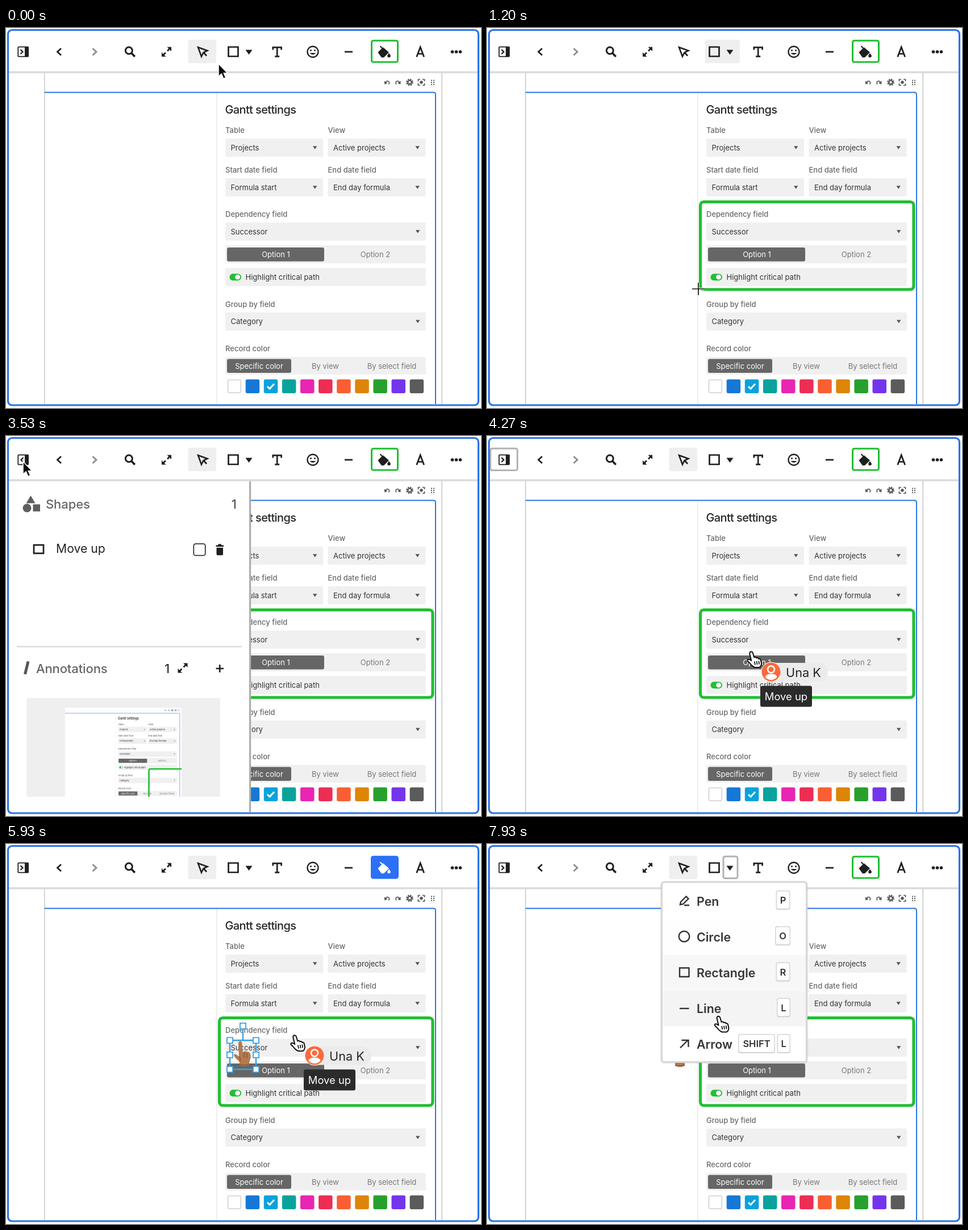
An HTML page that plays this animation: 836x670 px, repeating every 8 s.

```html
<!DOCTYPE html>
<html lang="en">
<head>
<meta charset="utf-8">
<title>Gantt settings</title>
<style>
html, body { margin: 0; width: 100%; height: 100%; overflow: hidden; background: #fff; }
svg { display: block; width: 100%; height: 100%; }
text { font-family: Inter, Roboto, sans-serif; font-optical-sizing: none; white-space: pre; }
.ink { fill: none; stroke: #1f1f1f; stroke-width: 2.7; }
.solid { fill: #1f1f1f; }
.focus { fill: none; stroke: #b3b3b3; stroke-width: 3; }
.small { fill: none; stroke: #555; stroke-width: 1.7; }
</style>
</head>
<body>
<svg id="stage" viewBox="0 0 836 670" preserveAspectRatio="none"></svg>
<script>
const TICK = 1000 / 15, LOOP = 8000;

// ---------- markup helpers ----------
const rect = (x, y, w, h, fill, r = 0, more = '') =>
  `<rect x="${x}" y="${y}" width="${w}" height="${h}" rx="${r}" fill="${fill}" ${more}/>`;
const text = (s, x, y, size, fill, weight = 400, more = '') =>
  `<text x="${x}" y="${y}" font-size="${size}" fill="${fill}" font-weight="${weight}" ${more}>${s}</text>`;
const path = (d, cls = 'ink', more = '') => `<path d="${d}" class="${cls}" ${more}/>`;
const group = (id, body, more = '') => `<g id="${id}" ${more}>${body}</g>`;
const mid = 'text-anchor="middle"';
const expand = (x, y) => path(
  `M${x - 6} ${y + 6}l4.5-4.5M${x + 1.5} ${y - 1.5}L${x + 6} ${y - 6}`, 'ink', 'stroke-width="2.4"') +
  path(`M${x + 1} ${y - 8.5}h7.5v7.5zM${x - 1} ${y + 8.5}h-7.5v-7.5z`, 'solid');

// ---------- settings panel ----------
const label = (s, x, y) => text(s, x, y, 13, '#696969', 500);
const select = (s, x, y, w) => rect(x, y, w, 32, '#f0f0f0', 2) +
  text(s, x + 9.5, y + 20.8, 13, '#333') +
  path(`M${x + w - 18} ${y + 13.3}h7.4l-3.7 5.4z`, 'none', 'fill="#555"');

function panel() {
  const colors = ['#fff', '#1677d6', '#08a2dc', '#0aa39b', '#e826b1', '#ec2e55',
    '#f95f33', '#de8507', '#28a02d', '#7335ec', '#5b5b5b'];
  const swatches = colors.map((c, i) => i
    ? rect(389.6 + i * 32.1, 619.5, 24.5, 24.5, c, 3)
    : rect(390.5, 620.3, 22.8, 22.8, c, 2.5, 'stroke="#d5d5d5" stroke-width="1.8"')).join('');
  return rect(370, 114, 1.4, 549, '#e8e8e8') +
    path('M68 113.5H752Q756 113.5 756 117.5V663', 'none', 'fill="none" stroke="#2b72e6" stroke-width="2"') +
    text('Gantt settings', 385.5, 150.7, 20, '#262626', 500, 'letter-spacing="-.62"') +
    label('Table', 386, 185) + label('View', 566.5, 185) +
    select('Projects', 386, 195, 172) + select('Active projects', 566.5, 195, 172) +
    label('Start date field', 386, 255) + label('End date field', 566.5, 255) +
    select('Formula start', 386, 265, 172) + select('End day formula', 566.5, 265, 172) +
    label('Dependency field', 386, 333) + select('Successor', 386, 343, 353) +
    rect(386, 383, 353, 32, '#f0f0f0', 2) + rect(389, 387, 171, 24.5, '#666', 3) +
    text('Option 1', 475, 404.3, 13, '#fff', 400, mid) + text('Option 2', 650, 404.3, 13, '#777', 400, mid) +
    rect(386, 423, 353, 32, '#f0f0f0', 2) + rect(393.5, 433.2, 20.5, 12, '#1fbf31', 6) +
    '<circle cx="407.6" cy="439.2" r="4.4" fill="#fff"/>' +
    text('Highlight critical path', 421.5, 444.2, 13, '#333') +
    label('Group by field', 386, 491.5) + select('Category', 386, 501.5, 353) +
    label('Record color', 386, 570) + rect(386, 580, 353, 31, '#f0f0f0', 2) +
    rect(389, 583.5, 113, 24.5, '#666', 3) +
    text('Specific color', 445.5, 600.8, 13, '#fff', 400, mid) +
    text('By view', 562, 600.8, 13, '#777', 400, mid) +
    text('By select field', 679, 600.8, 13, '#777', 400, mid) +
    swatches + path('M460 632l4 4 8-8.5', 'none', 'fill="none" stroke="#fff" stroke-width="3"') + tools();
}

function tools() {
  const dots = [0, 1, 2, 3, 4, 5].map(i =>
    rect(748 + i % 2 * 4, 91.5 + (i >> 1) * 3.6, 2, 2, '#555')).join('');
  return path('M668 97q1-4.5 4.5-3.2 3.5 1.7 1 5.4M692.500 97q-1-4.500-4.500-3.200-3.500 1.700-1 5.400', 'small') +
    path('M665.500 93.500l1 6 5-2.500zM695 93.500l-1 6-5-2.500z', 'none', 'fill="#555"') +
    '<circle cx="710.5" cy="95.700" r="5" fill="none" stroke="#555" stroke-width="2.600" stroke-dasharray="2.400 1.520"/>' +
    '<circle cx="710.5" cy="95.700" r="3.200" class="small" style="stroke-width:2.200"/>' +
    path('M725.500 94v-3.500h3.500M733 90.500h3.500V94M736.500 97.500v3.500H733M729 101h-3.500v-3.500', 'small') +
    '<circle cx="731" cy="95.700" r="2.700" fill="#555"/>' + dots;
}

// ---------- toolbar ----------
function toolbar() {
  return rect(5, 5, 826, 72, '#fff') + rect(5, 76.300, 826, 3.400, '#dadada') +
    rect(0, 20.500, 0, 41.500, '#efefef', 4, 'id="active"') +
    rect(21.300, 33.300, 17.500, 17, '#fff', 1, 'stroke="#1f1f1f" stroke-width="1.800"') +
    rect(33, 33, 7, 17.600, '#1f1f1f') +
    path('', 'ink', 'id="side" style="stroke-width:2.200"') +
    path('M97 36l-6.500 6 6.500 6') + path('M152.500 36l6.500 6-6.500 6', 'ink', 'style="stroke:#8a8a8a"') +
    '<circle cx="216.300" cy="39.800" r="6" class="ink" style="stroke-width:3"/>' +
    path('M220.500 44l6.300 6.500', 'ink', 'style="stroke-width:3.600"') + expand(282.500, 42) +
    path('M338 34l16.500 6-7 3.300-3.500 7z', 'ink', 'style="stroke-width:2.500"') +
    path('M347.500 43l5.500 6', 'ink') +
    path('M391.500 33.500h17v16.500h-17z') + path('M421.500 38.500h12l-6 8.500z', 'solid') +
    path('M469.800 38.500v-4.300h14.800v4.300M477.200 34v16M473.200 50.200h8') +
    '<circle cx="540" cy="42" r="9.500" class="ink" style="stroke-width:2.300"/>' +
    '<circle cx="536.500" cy="39.500" r="1.500" class="solid"/><circle cx="543.500" cy="39.500" r="1.500" class="solid"/>' +
    path('M534.500 44q5.500 6 11 0z', 'solid') + path('M596 42h14', 'ink') +
    rect(643.500, 22.300, 46, 37.700, '#fff', 3, 'id="fillBox" stroke-width="3"') +
    group('bucket', '<path d="M655 43l8.500-8.500 10 8.500-8.500 8.500h-4z"/>' +
      '<path d="M658.500 32l7 7M657 43l7-7 8 7" fill="none" stroke-width="2"/>' +
      '<path d="M674 45q5 6 0 6.500-5-.500 0-6.500z"/>') +
    path('M722.700 51l6.500-17.300 6.500 17.300M725 45.500h8.500') +
    [785.500, 792.500, 799.500].map(x => `<circle cx="${x}" cy="42" r="2.800" class="solid"/>`).join('') +
    '<rect id="sideFocus" class="focus" x="6" y="22" width="47.500" height="38.500" rx="3"/>' +
    '<rect id="caretFocus" class="focus" x="416" y="22" width="25" height="38.500" rx="3"/>';
}

// ---------- sidebar ----------
function sidebar() {
  const k = 205 / 699;
  return rect(5, 79.700, 424, 584, '#fff') + rect(428, 79.700, 3.200, 584, '#adadad') +
    path('M43.500 105l8 13.500h-16zM47.500 120.500h12.500v12.500h-12.500z', 'none', 'fill="#5f5f5f"') +
    '<circle cx="37" cy="127" r="7.500" fill="#5f5f5f"/>' +
    text('Shapes', 70, 128, 22, '#666', 500, 'letter-spacing="-.1"') +
    text('1', 406, 128, 22, '#555', 500, 'text-anchor="end"') +
    path('M49 192.200h17v14.600H49z') +
    rect(83.700, 182.700, 223.600, 33.600, '#fff', 0, 'id="input" stroke="#b3b3b3" stroke-width="3.500"') +
    text('', 88, 206.300, 21.200, '#222', 400, 'id="typed"') +
    rect(0, 186, 1.600, 25, '#111', 0, 'id="caret"') +
    rect(330.300, 190.200, 20.500, 20.500, '#fff', 3.500, 'stroke="#333" stroke-width="1.800"') +
    path('M369.500 192.500h13.500v2.800h-13.500zM373.500 190.500h5.500v2h-5.500zM370.500 197h11.500v11.500q0 1.800-1.800 1.800h-8q-1.700 0-1.700-1.800z', 'solid') +
    rect(19, 370, 396, 2.600, '#dcdcdc') +
    path('M39 397.500l-5.500 22.500', 'none', 'stroke="#555" stroke-width="5"') +
    text('Annotations', 53, 417.500, 22, '#666', 500, 'letter-spacing="-.12"') +
    text('1', 279, 417.500, 22, '#333', 500) + expand(311, 409) +
    path('M369.500 410h13.500M376.200 403.300v13.500') +
    rect(36, 462, 341, 174, '#efefef', 3) +
    `<g clip-path="url(#thumb)">${rect(104, 479, 205, 157, '#fff')}
     <use href="#panel" transform="translate(${104 - 68 * k} ${479 - 80 * k}) scale(${k})"/>
     <path d="M309 587H254.500Q251.500 587 251.500 590V640" fill="none" stroke="#1fbf31" stroke-width="2.600"/></g>`;
}

// ---------- shape menu ----------
function menu() {
  const names = ['Pen', 'Circle', 'Rectangle', 'Line', 'Arrow'];
  const icons = ['M340 107l1-5 9.500-9.500 4 4-9.500 9.500zM347 108h9', '', 'M339 218.500h16.500v15.500h-16.500z',
    'M339 290h16.500', 'M340 359.500l13.500-13.500M342.500 346h12v12'];
  const key = (s, x, y, w) => rect(x, y - 17, w, 34, '#d4d4d4', 4) +
    rect(x + 1.500, y - 15.500, w - 3, 30.300, '#fff', 3) +
    text(s, x + w / 2, y + 6, 16.500, '#333', 600, mid);
  const rows = names.map((s, i) => {
    const y = 101 + i * 63;
    return rect(310, y - 31.500, 251, 63, '#f4f4f4', 0, `id="row${i}"`) +
      path(icons[i], 'ink', 'style="stroke:#333;stroke-width:2.400"') +
      text(s, 369, y + 7.800, 21.400, '#363636', 600);
  }).join('');
  return rect(304.500, 65.500, 261, 322, '#000', 6, 'opacity=".06"') +
    rect(307.500, 67, 255, 317.500, '#fff', 5, 'stroke="#d6d6d6" stroke-width="3"') + rows +
    '<circle cx="347" cy="163" r="9.300" class="ink" style="stroke:#333;stroke-width:2.400"/>' +
    key('P', 508.500, 99, 25) + key('O', 507, 162, 27) + key('R', 508.500, 225.500, 25) +
    key('L', 510, 288.500, 24) + key('SHIFT', 442, 352, 65) + key('L', 510.500, 352, 23.500);
}

// ---------- emoji, cursors, name tag ----------
const skin = '<path d="M-8-20Q-7.500-24-4.800-24T-1.500-20L-.500-5Q4-8 7-5.500 12-6 13-1 15 4 11 13V18Q3 22-6 18V12Q-16 4-16 0-15-3-11 0L-7 3z" fill="#b37a4f"/>' +
  '<path d="M3-4q-2.500 5 0 9M8-3q-2.500 4 0 8M-6 12q3-5-1-9M-6 16q8 4 17 0" fill="none" stroke="#8b5635" stroke-width="1.500"/>';
const handles = [[-23, -25.500], [23, -25.500], [-23, 0], [23, 0], [-23, 25.500], [23, 25.500], [0, -51]]
  .map(([x, y]) => rect(x - 5, y - 5, 10, 10, '#fff', 0, 'stroke="#3c9fe3" stroke-width="1.800"')).join('');
const picked = '<path d="M-23-25.500h46v51h-46zM0-25.500V-51" fill="none" stroke="#3c9fe3" stroke-width="2.400"/>' + handles;

const arrow = '<path d="M0 0V22.500L5.200 17.800 8.800 26.200 12.800 24.400 9.200 16.400H15.800z" fill="#0b0b0b" stroke="#fff" stroke-width="1.500"/>';
const cross = '<path d="M-11 0H11M0-11V11" stroke="#fff" stroke-width="3.500"/><path d="M-11 0H11M0-11V11" stroke="#111" stroke-width="1.700"/>';
const hand = '<path d="M-2.800 2.500Q-2.500-.800-.200-.800 2-.800 3 2L5.200 9.500Q8 7.700 9.200 10.500 12 9 13.300 12 16.300 11 17 15L18 20Q18 24.500 14.500 27H6Q1.500 25-2.500 19.500L-6.500 15.500Q-7 11.800-3.200 13L.200 15z" fill="#fff" stroke="#111" stroke-width="2" stroke-linejoin="round"/>' +
  '<path d="M5.800 16.500l1.200 6M9.500 16l1.200 6M13.200 15.500l1 6" stroke="#111" stroke-width="1.700"/>';
const tag = '<path d="M35 19H119a16.300 16.300 0 0 1 0 32.600H35z" fill="#ebebeb"/>' +
  '<circle cx="35" cy="35" r="17.500" fill="#fff"/><circle cx="35" cy="35" r="16.600" fill="#fb6a3c"/>' +
  '<circle cx="35" cy="30.500" r="6" fill="none" stroke="#fff" stroke-width="2.500"/>' +
  '<path d="M24.500 44q1.500-5.500 10.500-5.500t10.500 5.500q-4 5-10.500 5t-10.500-5z" fill="#fff"/>' +
  text('Una K', 61, 43.700, 21.700, '#262626');
const tip = rect(16, 59.500, 91, 37, '#2b2b2b', 3.500) +
  text('Move up', 61.500, 84.500, 18.400, '#fff', 400, mid);

document.getElementById('stage').innerHTML =
  `<defs><clipPath id="thumb">${rect(104, 462, 205, 174, '#000')}</clipPath>
   <clipPath id="frame">${rect(5, 5, 826, 658, '#000')}</clipPath></defs>
   <g clip-path="url(#frame)">` +
  rect(67, 79, 1.500, 585, '#c6c6c6') + rect(766.500, 79, 1.500, 585, '#c6c6c6') +
  group('panel', panel()) +
  rect(0, 0, 0, 0, 'none', 6, 'id="box" stroke="#1fbf31" stroke-width="5.200"') +
  group('emoji', skin + group('picked', picked)) +
  group('sidebar', sidebar()) + toolbar() + group('menu', menu()) + '</g>' +
  rect(3.500, 3.500, 828, 661.500, 'none', 7, 'stroke="#2b72e8" stroke-width="3.200"') +
  group('tag', tag) + group('tip', tip) +
  group('arrow', arrow) + group('cross', cross) + group('hand', hand);

// ---------- motion, in ticks of 1/15 s ----------
const el = {};
document.querySelectorAll('[id]').forEach(n => el[n.id] = n);
const show = (n, on) => n.setAttribute('opacity', +on);
const set = (n, attrs) => { for (const a in attrs) n.setAttribute(a, attrs[a]); };
const place = (n, x, y) => n.setAttribute('transform', `translate(${x} ${y})`);
const within = (k, a, b) => k >= a && k < b;
const ramp = (k, a, b) => Math.max(0, Math.min(1, (k - a) / (b - a)));
const ease = p => p * p * (3 - 2 * p);

const route = [[0, 374, 63], [4, 401, 46], [6, 401, 46], [13, 752, 306], [18, 372, 460], [20, 372, 460],
  [24, 30, 45], [26, 30, 45], [31, 200, 200], [45, 240, 200], [52, 30, 45], [57, 30, 45], [58, 60, 72],
  [62, 465, 381], [69, 465, 381], [72, 538, 48], [75, 538, 48], [80, 480, 505], [82, 480, 505],
  [86, 508, 338], [88, 508, 338], [89, 477, 352], [93, 410, 386.500], [95, 410, 386.500], [101, 330, 388],
  [105, 330, 388], [109, 395, 442], [111, 395, 442], [114, 428, 42], [119, 405, 335]];
function pointer(k) {
  const i = Math.max(1, route.findIndex(r => r[0] >= k));
  const [a, x, y] = route[i - 1], [b, u, v] = route[i];
  const p = ease(ramp(k, a, b));
  return [x + (u - x) * p, y + (v - y) * p];
}

const typing = [[32, 'M'], [33, 'Mo'], [34, 'Mov'], [35, 'Move'], [38, 'Move u'], [39, 'Move up']];

function draw(k) {
  const [x, y] = pointer(k);

  // green rectangle grows from its top right corner
  const [bx, by] = k < 18 ? [x, y] : [372, 460];
  const left = Math.min(751, bx + 3.500);
  set(el.box, { x: left, y: 306.700, width: 751 - left, height: Math.max(0, by + 1 - 306.700) });
  show(el.box, k > 13);

  // sidebar and its name input
  const open = ease(ramp(k, 24, 27)) - ease(ramp(k, 52, 55));
  place(el.sidebar, -430 * (1 - open), 0);
  show(el.sidebar, open > 0);
  el.side.setAttribute('d', within(k, 25, 53) ? 'M30.500 38l-4 4 4 4' : 'M25.500 38l4 4-4 4');
  const word = typing.filter(s => k >= s[0]).pop();
  el.typed.textContent = word ? word[1] : '';
  const editing = within(k, 31, 42);
  show(el.input, editing);
  show(el.caret, editing);
  el.caret.setAttribute('x', 88 + (word ? el.typed.getComputedTextLength() : 0));

  // toolbar state
  const [ax, aw] = within(k, 6, 21) ? [384, 61] : within(k, 75, 82) ? [515.500, 49] : [320.500, 49.500];
  set(el.active, { x: ax, width: aw });
  show(el.sideFocus, within(k, 53, 70));
  show(el.caretFocus, k >= 114);
  const blue = within(k, 82, 106);
  set(el.fillBox, { fill: blue ? '#2b70f7' : '#fff', stroke: blue ? '#2b70f7' : '#1fbf31' });
  set(el.bucket, { fill: blue ? '#fff' : '#1f1f1f', stroke: blue ? '#fff' : '#1f1f1f' });

  // emoji follows the drag
  const p = ease(ramp(k, 95, 101));
  place(el.emoji, 417 - 80 * p, 371.800 + 1.500 * p);
  show(el.emoji, k >= 82);
  show(el.picked, k < 104);

  // menu rows keep a short trail of highlight
  show(el.menu, k >= 114);
  const at = (y - 101) / 63 - .71;
  for (let i = 0; i < 5; i++) {
    const d = i - at;
    show(el['row' + i], d > .5 ? 0 : Math.max(0, Math.min(1, 1 + .6 * d)));
  }

  // pointer, with the name tag one tick behind
  const kind = k >= 59 ? 'hand' : within(k, 6, 21) && y > 80 ? 'cross' : 'arrow';
  for (const c of ['arrow', 'cross', 'hand']) {
    place(el[c], x, y);
    show(el[c], c === kind && !within(k, 32, 46));
  }
  const [tx, ty] = pointer(Math.max(0, k - 1));
  place(el.tag, tx, ty);
  place(el.tip, tx, ty);
  const soft = k < 64 ? .5 : 1;
  show(el.tag, within(k, 62, 71) || within(k, 77, 113) ? soft : 0);
  show(el.tip, within(k, 62, 70) || within(k, 82, 91) ? soft : 0);
}

const start = performance.now();
let last = -1;
function frame() {
  const t = (performance.now() - start) % LOOP;
  const k = Math.min(119, Math.floor(t / TICK + .03));
  if (k !== last) draw(last = k);
  requestAnimationFrame(frame);
}
frame();
</script>
</body>
</html>
```
